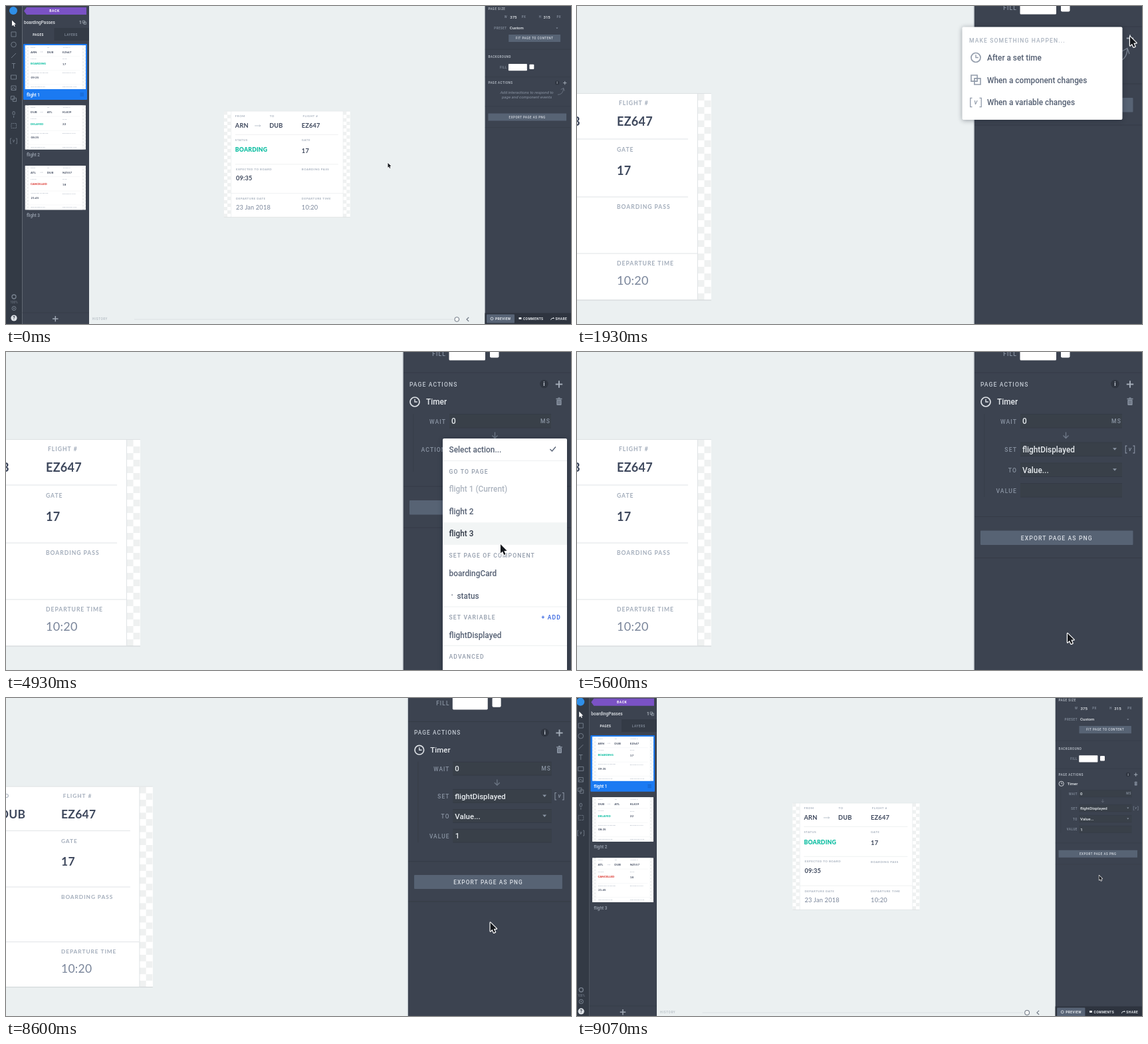
An HTML page with a canvas for the animation above (9130 ms loop, 850 by 478 pixels).

```html
<!DOCTYPE html>
<html lang="en">
<head>
<meta charset="utf-8">
<title>Page actions</title>
<style>
html, body { margin: 0; width: 100%; height: 100%; overflow: hidden; background: #ebf0f1; }
canvas { display: block; width: 850px; height: 478px; }
</style>
</head>
<body>
<canvas id="stage"></canvas>
<script>
const W = 850, H = 478, LOOP = 9130, STEP = 1000 / 15;
const ZOOM = 1.95, PIVOT_Y = 186.3;
const UI = 'Roboto, sans-serif', CARD = 'Lato, sans-serif';
const canvas = document.getElementById('stage');
const ctx = canvas.getContext('2d');
const dpr = window.devicePixelRatio || 1;
canvas.width = W * dpr;
canvas.height = H * dpr;

// ---- timing ----
const clamp = u => Math.max(0, Math.min(1, u));
const span = (t, a, b) => clamp((t - a) / (b - a));
const within = (t, a, b) => t >= a && t < b;
const sine = u => (1 - Math.cos(Math.PI * u)) / 2;
const soft = u => u < .5 ? .5 * (2 * u) ** 1.5 : 1 - .5 * (2 - 2 * u) ** 1.5;
const linear = u => u;

const moves = [
  [533, 1330, 832, 46, sine],
  [2270, 2600, 672, 72, sine],
  [3400, 3800, 752, 144, sine],
  [4600, 4933, 744, 289, linear],
  [4933, 5400, 738, 423, linear],
  [5940, 6470, 731, 212, sine],
  [7800, 8200, 725, 342, sine]
];

function pointer(t) {
  let x = 312.8, y = 283;
  for (const [a, b, nx, ny, ease] of moves) {
    const p = ease(span(t, a, b));
    x += (nx - x) * p;
    y += (ny - y) * p;
  }
  return { x, y };
}

function pointerKind(t) {
  if (within(t, 1330, 1800) || within(t, 2500, 3060) || within(t, 3700, 4460)) return 'hand';
  if (within(t, 6390, 7260)) return 'text';
  if (within(t, 7260, 7860)) return 'none';
  return 'arrow';
}

// ---- drawing helpers ----
function view(k) {
  ctx.setTransform(k * dpr, 0, 0, k * dpr, W * (1 - k) * dpr, PIVOT_Y * (1 - k) * dpr);
}

function box(x, y, w, h, fill, r = 0) {
  ctx.fillStyle = fill;
  ctx.beginPath();
  ctx.roundRect(x, y, w, h, r);
  ctx.fill();
}

function path(pts, color, width = 1, close = false) {
  ctx.beginPath();
  pts.forEach(([x, y], i) => i ? ctx.lineTo(x, y) : ctx.moveTo(x, y));
  if (close) ctx.closePath();
  ctx.strokeStyle = color;
  ctx.lineWidth = width;
  ctx.stroke();
}

const rule = (x1, x2, y, color, width = 1) => path([[x1, y], [x2, y]], color, width);

function frame(x, y, w, h, color, width = 1, r = 0) {
  ctx.beginPath();
  ctx.roundRect(x, y, w, h, r);
  ctx.strokeStyle = color;
  ctx.lineWidth = width;
  ctx.stroke();
}

function ring(x, y, r, color, width = 1) {
  ctx.beginPath();
  ctx.arc(x, y, r, 0, 7);
  ctx.strokeStyle = color;
  ctx.lineWidth = width;
  ctx.stroke();
}

function dot(x, y, r, color) {
  ctx.beginPath();
  ctx.arc(x, y, r, 0, 7);
  ctx.fillStyle = color;
  ctx.fill();
}

function text(s, x, y, size, color, o = {}) {
  ctx.font = `${o.italic ? 'italic ' : ''}${o.weight || 400} ${size}px ${o.font || UI}`;
  ctx.letterSpacing = (o.gap || 0) + 'px';
  ctx.textAlign = o.align || 'left';
  ctx.fillStyle = color;
  ctx.fillText(s, x, y + size * .355);
}

const label = (s, x, y, color = '#8a94a3', align = 'left') =>
  text(s, x + (align === 'right' ? 1 : 0), y, 8.6, color, { weight: 500, gap: 1.1, align });
const value = (s, x, y, color = '#e6eaee') => text(s, x, y, 11.85, color, { weight: 500 });

function caret(x, y, color = '#8a94a3') {
  ctx.fillStyle = color;
  ctx.beginPath();
  ctx.moveTo(x - 3, y - 1.7);
  ctx.lineTo(x + 3, y - 1.7);
  ctx.lineTo(x, y + 1.8);
  ctx.fill();
}

function plus(x, y, r, color, width) {
  path([[x - r, y], [x + r, y]], color, width);
  path([[x, y - r], [x, y + r]], color, width);
}

function clock(x, y, color, r = 7) {
  ring(x, y, r, color, 1.7);
  path([[x, y - r * .6], [x, y], [x + r * .55, y]], color, 1.4);
}

function copies(x, y, r, color, width) {
  frame(x - r, y - r, r * 1.3, r * 1.3, color, width);
  frame(x - r * .3, y - r * .3, r * 1.3, r * 1.3, color, width);
}

function variable(x, y, color, size = 10) {
  const w = size * .75, h = size * .6, b = size * .25;
  for (const d of [-1, 1])
    path([[x + d * (w - b), y - h], [x + d * w, y - h], [x + d * w, y + h], [x + d * (w - b), y + h]], color, size * .12);
  text('v', x, y - size * .06, size, color, { italic: true, weight: 500, align: 'center' });
}

function withShadow(draw) {
  ctx.save();
  ctx.shadowColor = 'rgba(20,28,40,.4)';
  ctx.shadowBlur = 7 * dpr;
  ctx.shadowOffsetY = 1 * dpr;
  draw();
  ctx.restore();
}

// ---- boarding card ----
const flights = [
  { from: 'ARN', to: 'DUB', code: 'EZ647', status: 'BOARDING', gate: '17', time: '09:35', color: '#10bfa3' },
  { from: 'DUB', to: 'ATL', code: 'KL839', status: 'DELAYED', gate: '22', time: '08:35', color: '#10bfa3' },
  { from: 'ATL', to: 'DUB', code: 'NZ557', status: 'CANCELLED', gate: '18', time: '21:45', color: '#dc3a34' }
];

function card(f) {
  box(-168, 131.5, 370, 310.5, '#fff');
  ctx.fillStyle = '#eff1f1';
  for (const x0 of [-168, 181.5])
    for (let r = 0; r < 31; r++)
      ctx.fillRect(x0 + (r % 2) * 10, 132 + r * 10, 10, 10);
  box(-147, 131.5, 328.5, 310.5, '#fff');
  rule(-168, 202, 131.5, '#dde1e3');
  rule(-168, 202, 442, '#cdd2d4');
  path([[181.5, 132], [181.5, 442]], '#dfe3e5');
  path([[-147, 132], [-147, 442]], '#dfe3e5');
  rule(-135, 167, 200, '#dfe3e6');
  rule(-135, 167, 287, '#dfe3e6');
  rule(-147, 181, 372, '#dfe3e6');

  const cap = (s, x, y) => text(s, x, y, 8.6, '#a3adbb', { font: CARD, weight: 700, gap: .95 });
  const big = (s, x, y, color = '#3d475c', size = 18, weight = 700) =>
    text(s, x, y, size, color, { font: CARD, weight, gap: .3 });
  cap('FROM', -135, 146);
  cap('TO', -34, 146);
  cap('FLIGHT #', 63, 146);
  big(f.from, -135, 174);
  big(f.to, -35, 174);
  big(f.code, 60, 174);
  rule(-78, -61, 174, '#a3adbb', 1.4);
  path([[-64, 171], [-61, 174], [-64, 177]], '#a3adbb', 1.4);
  cap('STATUS', -135, 215);
  cap('GATE', 60, 216);
  big(f.status, -135, 245, f.color, 17, 900);
  big(f.gate, 60, 248);
  cap('EXPECTED TO BOARD', -133, 301);
  cap('BOARDING PASS', 60, 302);
  big(f.time, -133, 328);
  cap('DEPARTURE DATE', -133, 387);
  cap('DEPARTURE TIME', 60, 387);
  big('23 Jan 2018', -133, 413, '#79859a', 18, 400);
  big('10:20', 60, 413, '#79859a', 18, 400);
}

// ---- left side and bottom bars ----
function toolbar() {
  const c = '#78828f';
  box(0, -10, 24.5, 500, '#333a45');
  dot(11, 7, 6, '#2f8fe8');
  ctx.fillStyle = '#fff';
  ctx.beginPath();
  [[9, 21.5], [9, 30], [11, 28.4], [12.5, 31], [13.7, 30.4], [12.5, 27.8], [15, 27.6]].forEach(p => ctx.lineTo(...p));
  ctx.fill();
  frame(8, 39, 7, 7, c, .9);
  ring(11.5, 58, 3.8, c, .9);
  path([[8, 78], [15, 71]], c, .9);
  text('T', 11.5, 90.5, 10, c, { align: 'center' });
  frame(7.5, 104, 8, 6, c, .9);
  frame(8, 120, 7, 6.5, c, .9);
  path([[8, 126], [11, 122.5], [15, 126]], c, .9);
  copies(11.5, 139.5, 4, c, .9);
  frame(10, 158.5, 3.2, 5, c, .9, 1.6);
  path([[11.6, 165], [11.6, 168]], c, .9);
  ctx.setLineDash([1.6, 1]);
  frame(8, 176.5, 7.5, 7, c, .9);
  ctx.setLineDash([]);
  variable(11.5, 203, c, 6.5);
  ring(12, 437, 3, c, 1.3);
  text('100%', 12, 445.5, 4.6, c, { align: 'center' });
  ring(12, 454.5, 3, c, 1);
  dot(12, 454.5, 1, c);
  dot(12, 469, 4.6, '#dfe3e8');
  text('?', 12, 469, 7, '#333a45', { weight: 700, align: 'center' });
}

function pages(s) {
  box(24.5, -10, 100.5, 500, '#3c4350');
  ctx.fillStyle = '#7a52c5';
  ctx.beginPath();
  [[27, 7.5], [31, 2], [121, 2], [121, 13], [31, 13]].forEach(p => ctx.lineTo(...p));
  ctx.fill();
  text('BACK', 73, 7.7, 5, '#fff', { weight: 700, gap: .6, align: 'center' });
  text('boardingPasses', 27, 24.5, 6.5, '#dfe3e8', { weight: 500 });
  text('1', 110, 24.5, 6.5, '#c5ccd5', { weight: 500 });
  copies(117.8, 24.8, 2.6, '#a6afbb', .7);
  box(72.5, 33, 52.5, 19, '#343b46');
  text('PAGES', 48.5, 43, 4.6, '#eef1f4', { weight: 700, gap: .5, align: 'center' });
  text('LAYERS', 98, 43, 4.6, '#8a94a3', { weight: 500, gap: .6, align: 'center' });
  box(26, 57, 96, 84, '#1b7af2', 1);
  flights.forEach((f, i) => {
    const top = 59 + i * 90.6;
    ctx.save();
    ctx.beginPath();
    ctx.rect(28.5, top, 91.5, 66);
    ctx.clip();
    box(28.5, top, 91.5, 66, '#fff');
    ctx.translate(37 + 135 * .2465, top + 10 - 174 * .2465);
    ctx.scale(.2465, .2465);
    card(f);
    ctx.restore();
    text('flight ' + (i + 1), 31, top + 74.3, 6.4, i ? '#9aa3b0' : '#fff', { weight: 500 });
  });
  for (let i = 0; i < 3; i++) rule(111.5, 117, 131 + i * 2, '#1560c4', .9);
  rule(24.5, 125, 461, '#353c47', .8);
  plus(74.3, 470.2, 4.2, '#a0a9b5', 1.5);
}

function history() {
  text('HISTORY', 130, 470.5, 4.6, '#b4bcc3', { weight: 500, gap: .6 });
  rule(193, 673, 471, '#dce1e3', 1);
  dot(678.3, 471, 3.6, '#f5f7f7');
  ring(678.3, 471, 3.4, '#6d7683', 1);
  path([[696.2, 468], [693, 471], [696.2, 474]], '#6d7683', 1.1);
}

function footer() {
  const o = { weight: 700, gap: .4 };
  box(720.5, 461.5, 130, 30, '#2e343f');
  box(723, 463.5, 42, 13, '#586476', 1);
  ring(731, 470, 2, '#e6eaee', .8);
  text('PREVIEW', 736, 470.3, 4.9, '#e6eaee', o);
  box(771.5, 468, 4, 3, '#e6eaee', .6);
  text('COMMENTS', 778, 470.3, 4.9, '#e6eaee', o);
  path([[819.5, 472], [821, 469.5], [824.5, 469.5], [823, 468]], '#e6eaee', .9);
  text('SHARE', 826.5, 470.3, 4.9, '#e6eaee', o);
}

// ---- right panel ----
function button(s, x, y, w) {
  box(x, y, w, 21.5, '#576374', 1);
  label(s, x + w / 2, y + 11, '#d9dee5', 'center');
}

function field(name, y) {
  label(name, 661, y + .5, '#8a94a3', 'right');
  box(667, y - 10.5, 153, 20.5, '#394049', 1);
  rule(667, 820, y - 10.5, '#343a45');
  rule(667, 820, y + 10, '#343a45');
}

function trash(x, y, c) {
  rule(x - 4.5, x + 4.5, y - 4, c, 1.5);
  rule(x - 1.5, x + 1.5, y - 5.5, c, 1.2);
  box(x - 3.6, y - 2.8, 7.2, 8.3, c, 1);
  for (const d of [-1.2, 1.2]) path([[x + d, y - 1.5], [x + d, y + 4]], '#3c4350', .7);
}

function panel(t) {
  const hasTimer = t >= 2930, isSet = t >= 5590;
  box(597.5, -200, 260, 1000, '#3c4350');
  path([[597, -200], [597, 800]], '#c3cacf', 1);

  label('PAGE SIZE', 607, -168, '#c3cad3');
  label('W', 662, -144, '#8a94a3', 'right');
  value('375', 671, -144);
  label('PX', 705, -144);
  label('H', 762, -144, '#8a94a3', 'right');
  value('315', 769, -144);
  label('PX', 808, -144);
  label('PRESET', 661, -111, '#8a94a3', 'right');
  value('Custom', 670, -112);
  caret(809, -112);
  button('FIT PAGE TO CONTENT', 667, -93, 152);
  rule(598, 850, -50, '#353b46');
  label('BACKGROUND', 607, -27, '#c3cad3');
  label('FILL', 661, 3, '#8a94a3', 'right');
  box(666.5, -7.5, 54.5, 20, '#fff', 1.5);
  box(728, -6, 13.5, 14.5, '#fff', 2);
  rule(598, 850, 31, '#353b46');
  label('PAGE ACTIONS', 607, 48.5, '#c3cad3');
  dot(809.5, 48, 6.3, '#2f3540');
  text('i', 809.5, 48, 9, '#c3cad3', { weight: 700, align: 'center' });
  plus(832, 48.5, 5.2, '#a5aeba', 1.9);

  let y = 117;
  if (hasTimer) {
    timer(t, isSet);
    y = isSet ? 247.5 : 202;
  } else {
    const o = { italic: true, align: 'center' };
    text('Add interactions to respond to', 720.5, 76.5, 12, '#8a94a3', o);
    text('page and component events', 720.5, 90, 12, '#8a94a3', o);
    ctx.beginPath();
    ctx.moveTo(811, 83);
    ctx.quadraticCurveTo(827, 83, 828, 64);
    ctx.strokeStyle = '#7c8695';
    ctx.lineWidth = 1.3;
    ctx.stroke();
    path([[820, 68], [828, 63.5], [831, 72]], '#7c8695', 1.3);
  }
  rule(598, 850, y, '#353b46');
  button('EXPORT PAGE AS PNG', 607, y + 21, 229.5);
  rule(598, 850, y + 62, '#353b46');
}

function timer(t, isSet) {
  clock(615, 75, '#dfe3e8');
  value('Timer', 632, 75);
  trash(832, 74.5, '#8a94a3');
  if (within(t, 3600, 4130) || within(t, 6260, 7990)) {
    frame(799, 65.5, 19.5, 19, '#343a45', 1, 9);
    caret(809, 75);
  }
  path([[613, 93], [613, isSet ? 218 : 180]], '#373e49');
  field('WAIT', 104);
  value('0', 670, 104);
  label('MS', 818, 104, '#8a94a3', 'right');
  path([[735.5, 120.5], [735.5, 129]], '#6f7988', 1.3);
  path([[731.5, 125.5], [735.5, 129.5], [739.5, 125.5]], '#6f7988', 1.3);
  field(isSet ? 'SET' : 'ACTION', 146.5);
  caret(809, 146);
  if (!isSet) {
    value('Select action...', 670, 147);
    return;
  }
  value('flightDisplayed', 670, 146.5);
  variable(832, 146.5, '#8a94a3', 9);
  field('TO', 177.5);
  value('Value...', 670, 178);
  caret(809, 177);
  field('VALUE', 208);
  if (within(t, 6660, 8130)) {
    frame(667, 197.5, 152, 22, '#2a73d9', 2.2, 1.5);
    const typed = t >= 7330;
    const blink = within(t, 7270, 7330) || within(t, 7660, 7860);
    if (!blink) path([[typed ? 678 : 671.5, 201], [typed ? 678 : 671.5, 215.5]], '#e6eaee', 1);
  }
  if (t >= 7330) value('1', 670.5, 208);
}

// ---- pop-ups ----
const hovered = (p, y) => Math.abs(p.y - y) <= 16.8;

function triggers(t, p) {
  withShadow(() => box(579.5, 31.5, 241, 139.5, '#fff', 2));
  label('MAKE SOMETHING HAPPEN...', 590, 51.5, '#aab3bf');
  if (t > 2330 && hovered(p, 77.5)) box(579.5, 61, 241, 33.5, '#f2f5f5');
  const c = '#929cab';
  clock(600, 77.5, c, 7);
  copies(600, 111, 7, c, 1.6);
  variable(600, 145, c, 11);
  ['After a set time', 'When a component changes', 'When a variable changes']
    .forEach((s, i) => value(s, 617, 78 + i * 33.6, '#556073'));
}

function actions(p) {
  withShadow(() => box(657, 130, 187, 400, '#fff', 2));
  const rows = [['flight 1 (Current)', 206], ['flight 2', 240], ['flight 3', 273], ['boardingCard', 332.5], ['flightDisplayed', 425.5]];
  value('Select action...', 666.5, 147, '#556073');
  path([[818.5, 146], [821.5, 149], [827, 142.5]], '#556073', 1.3);
  for (const y of [163.5, 383, 441.5]) rule(657, 844, y, '#edf0f1');
  label('GO TO PAGE', 666.5, 180, '#929cab');
  rows.forEach(([s, y], i) => {
    const on = i && hovered(p, y);
    if (on) box(657, y - 16.8, 187, 33.6, '#f2f5f5');
    value(s, 666.5, y, i ? (on ? '#2e3644' : '#556073') : '#adb5c0');
  });
  label('SET PAGE OF COMPONENT', 666.5, 306, '#929cab');
  if (hovered(p, 366)) box(657, 349.3, 187, 33.5, '#f2f5f5');
  value('·', 669.5, 366, '#556073');
  value('status', 678.5, 366.5, '#556073');
  label('SET VARIABLE', 666.5, 399, '#929cab');
  label('+ ADD', 834, 399, '#2f5fe0', 'right');
  label('ADVANCED', 666.5, 458, '#929cab');
}

// ---- pointer ----
function drawPointer(t, { x, y }) {
  const kind = pointerKind(t);
  if (kind === 'none') return;
  ctx.save();
  ctx.translate(x, y);
  ctx.lineJoin = 'round';
  if (kind === 'text') {
    for (const [c, w] of [['#6f7785', 2.4], ['#20262f', 1.1]]) {
      path([[0, -7], [0, 7]], c, w);
      path([[-3.5, -8], [0, -6.5], [3.5, -8]], c, w);
      path([[-3.5, 8], [0, 6.5], [3.5, 8]], c, w);
    }
  } else {
    const arrow = kind === 'arrow';
    const pts = arrow
      ? [[0, 0], [0, 13.5], [3, 10.7], [5.3, 15.8], [7.6, 14.8], [5.3, 9.8], [9.6, 9.6]]
      : [[-1, 0], [1.2, 0], [1.6, 5], [8, 6.8], [8.6, 10], [6.6, 16], [0, 16], [-5.4, 9.4], [-4, 8], [-1.2, 10]];
    ctx.beginPath();
    pts.forEach(q => ctx.lineTo(...q));
    ctx.closePath();
    ctx.fillStyle = arrow ? '#15181d' : '#fff';
    ctx.strokeStyle = arrow ? '#fff' : '#15181d';
    ctx.lineWidth = arrow ? 2.4 : 1.6;
    ctx.stroke();
    ctx.fill();
  }
  ctx.restore();
}

function render(t) {
  const zoomIn = soft(span(t, 1304, 1904)), zoomOut = soft(span(t, 8533.4, 9083));
  const s = 1 + (ZOOM - 1) * (zoomIn - zoomOut);
  const p = pointer(t);
  ctx.setTransform(dpr, 0, 0, dpr, 0, 0);
  box(0, 0, W, H, '#ebf0f1');
  view(s / ZOOM);
  card(flights[0]);
  view(s);
  history();
  pages();
  toolbar();
  view(s / ZOOM);
  panel(t);
  view(s);
  footer();
  view(s / ZOOM);
  if (within(t, 1795, 2930)) triggers(t, p);
  if (within(t, 4130, 5590)) actions(p);
  drawPointer(t, p);
}

const start = performance.now();
function tick(now) {
  const t = Math.max(0, now - start) % LOOP;
  render(Math.floor((t + 4) / STEP) * STEP);
  requestAnimationFrame(tick);
}
render(0);
requestAnimationFrame(tick);
</script>
</body>
</html>
```
